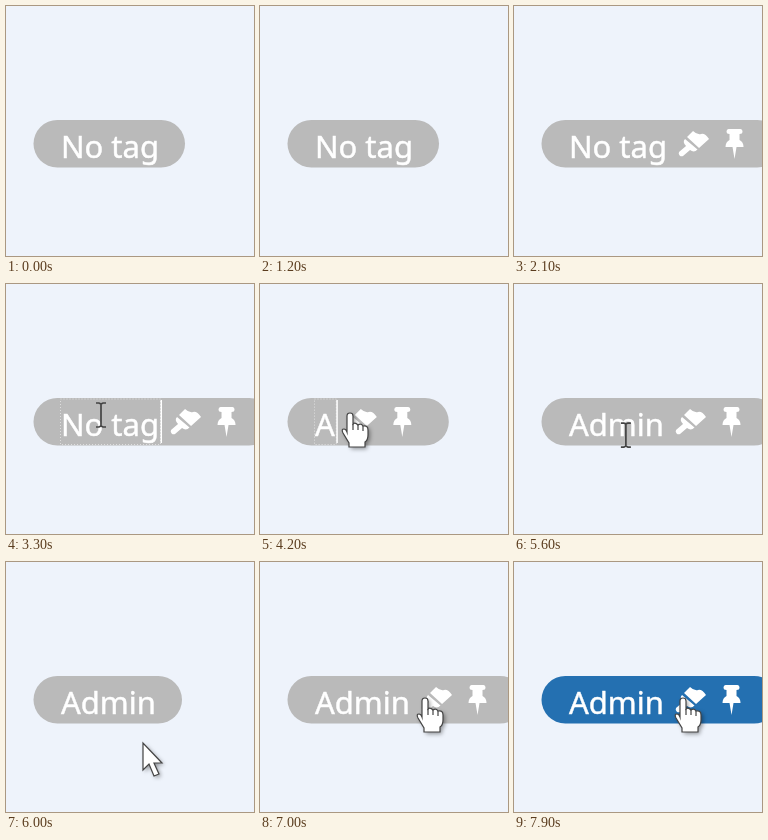
These frames come from a looping animation (248 px wide and 250 px high, 8 s). An HTML page with a canvas:

```html
<!DOCTYPE html>
<html lang="en">
<head>
<meta charset="utf-8">
<style>
  html, body { margin: 0; width: 100%; height: 100%; overflow: hidden; background: #eef3fb; }
  canvas { display: block; width: 248px; height: 250px; }
</style>
</head>
<body>
<canvas></canvas>
<script>
const LOOP = 8000, TEXT_X = 55, TOP = 114, HEIGHT = 47.5;
const GREY = [186, 186, 186], BLUE = [36, 112, 177];

const canvas = document.querySelector('canvas');
const ctx = canvas.getContext('2d');
const ratio = window.devicePixelRatio || 1;
canvas.width = 248 * ratio;
canvas.height = 250 * ratio;

const brush = new Path2D('M-1-13Q3-9 7-10T15-5L5 4-7-7Z M-9-5L3.5 5.5Q0 9-4 6L-11 12A3 3 0 0 1-15 8L-8 2Q-12-2-9-5Z');
const pin = new Path2D('M-6-15H6Q8-15 8-12.5T5-10V-4Q9-2 9 3H2L0 15-2 3H-9Q-9-2-5-4V-10Q-8-10-8-12.5T-6-15Z');
const hand = new Path2D('M-3 3Q-3 0 0 0T3 3V11Q5 9 8 12Q11 10 13 13Q18 12 18 17V22Q18 27 15 29V34H-1V30L-7 20Q-9 16-6 16Q-4 16-3 19Z');
const knuckles = new Path2D('M3 11V17M8 12V17M13 13V18');
const arrow = new Path2D('M0 0V27L6 21 11 33 16 31 11 20H19Z');
const beam = new Path2D('M-5-12H-2L0-11 2-12H5M0-11V11M-5 12H-2L0 11 2 12H5');

// Pointer stops: time, x, y
const route = [
  [2800, 95, 131], [5400, 95, 131], [5900, 137, 181], [6250, 137, 181],
  [6950, 170, 138], [7299, 170, 138], [7300, 174, 138], [LOOP, 174, 138]
];

function pointerAt(t) {
  const i = route.findIndex(stop => stop[0] > t);
  if (i < 1) return null;
  const [t0, x0, y0] = route[i - 1], [t1, x1, y1] = route[i];
  const k = (t - t0) / (t1 - t0);
  return { x: x0 + (x1 - x0) * k, y: y0 + (y1 - y0) * k };
}

function labelAt(t) {
  if (t < 4200) return 'No tag'.slice(0, 6 - Math.max(0, Math.floor((t - 3500) / 100)));
  return 'Admin'.slice(0, 1 + Math.max(0, Math.floor((t - 4400) / 100)));
}

function fillColor(t) {
  const k = Math.min(1, Math.max(0, (t - 7430) / 420));
  const eased = k * k * (3 - 2 * k);
  return `rgb(${GREY.map((c, i) => Math.round(c + (BLUE[i] - c) * eased))})`;
}

function at(x, y, draw) {
  ctx.save();
  ctx.translate(x, y);
  draw();
  ctx.restore();
}

function drawOutlined(path) {
  ctx.save();
  ctx.shadowColor = 'rgba(0,0,0,.4)';
  ctx.shadowBlur = 4 * ratio;
  ctx.shadowOffsetX = ctx.shadowOffsetY = 2 * ratio;
  ctx.fillStyle = '#fff';
  ctx.fill(path);
  ctx.restore();
  ctx.strokeStyle = '#444';
  ctx.lineWidth = 1.2;
  ctx.stroke(path);
}

function drawPointer({ x, y }, textEnd) {
  if (y > TOP + HEIGHT) {
    at(x, y, () => drawOutlined(arrow));
  } else if (x < textEnd) {
    at(x, y, () => {
      ctx.strokeStyle = '#444';
      ctx.lineWidth = 1.7;
      ctx.stroke(beam);
    });
  } else {
    at(x - 5, y - 2, () => {
      drawOutlined(hand);
      ctx.stroke(knuckles);
    });
  }
}

function drawLabel(label) {
  ctx.fillStyle = ctx.strokeStyle = '#fff';
  ctx.lineWidth = 0.5;
  ctx.fillText(label, TEXT_X, 151.5);
  ctx.strokeText(label, TEXT_X, 151.5);
}

function drawEditing(t, textEnd) {
  ctx.strokeStyle = 'rgba(255,255,255,.55)';
  ctx.lineWidth = 1;
  ctx.setLineDash([1, 2]);
  ctx.strokeRect(54.5, TOP + 1, textEnd - 53, HEIGHT - 2);
  ctx.setLineDash([]);
  if (Math.floor((t - 3200) / 500) % 2 === 0) {
    ctx.fillStyle = '#fff';
    ctx.fillRect(textEnd + 1.5, 116, 1.5, 43);
  }
}

function render(t) {
  const pointer = pointerAt(t);
  const label = labelAt(t);
  const hovered = t >= 2100 && (!pointer || pointer.y < TOP + HEIGHT);

  ctx.setTransform(ratio, 0, 0, ratio, 0, 0);
  ctx.fillStyle = '#eef3fb';
  ctx.fillRect(0, 0, 248, 250);
  ctx.font = '31px "Noto Sans", sans-serif';
  const textEnd = TEXT_X + ctx.measureText(label).width;

  ctx.fillStyle = fillColor(t);
  ctx.beginPath();
  ctx.roundRect(27.5, TOP, textEnd + (hovered ? 114 : 26) - 27.5, HEIGHT, HEIGHT / 2);
  ctx.fill();

  drawLabel(label);
  if (hovered) {
    at(textEnd + 27, 138, () => ctx.fill(brush));
    at(textEnd + 67.5, 138, () => ctx.fill(pin));
  }
  if (t >= 3200 && t < 5400) drawEditing(t, textEnd);
  if (pointer) drawPointer(pointer, textEnd);
}

const start = performance.now();
function tick() {
  render((performance.now() - start) % LOOP);
  requestAnimationFrame(tick);
}
tick();
</script>
</body>
</html>
```
